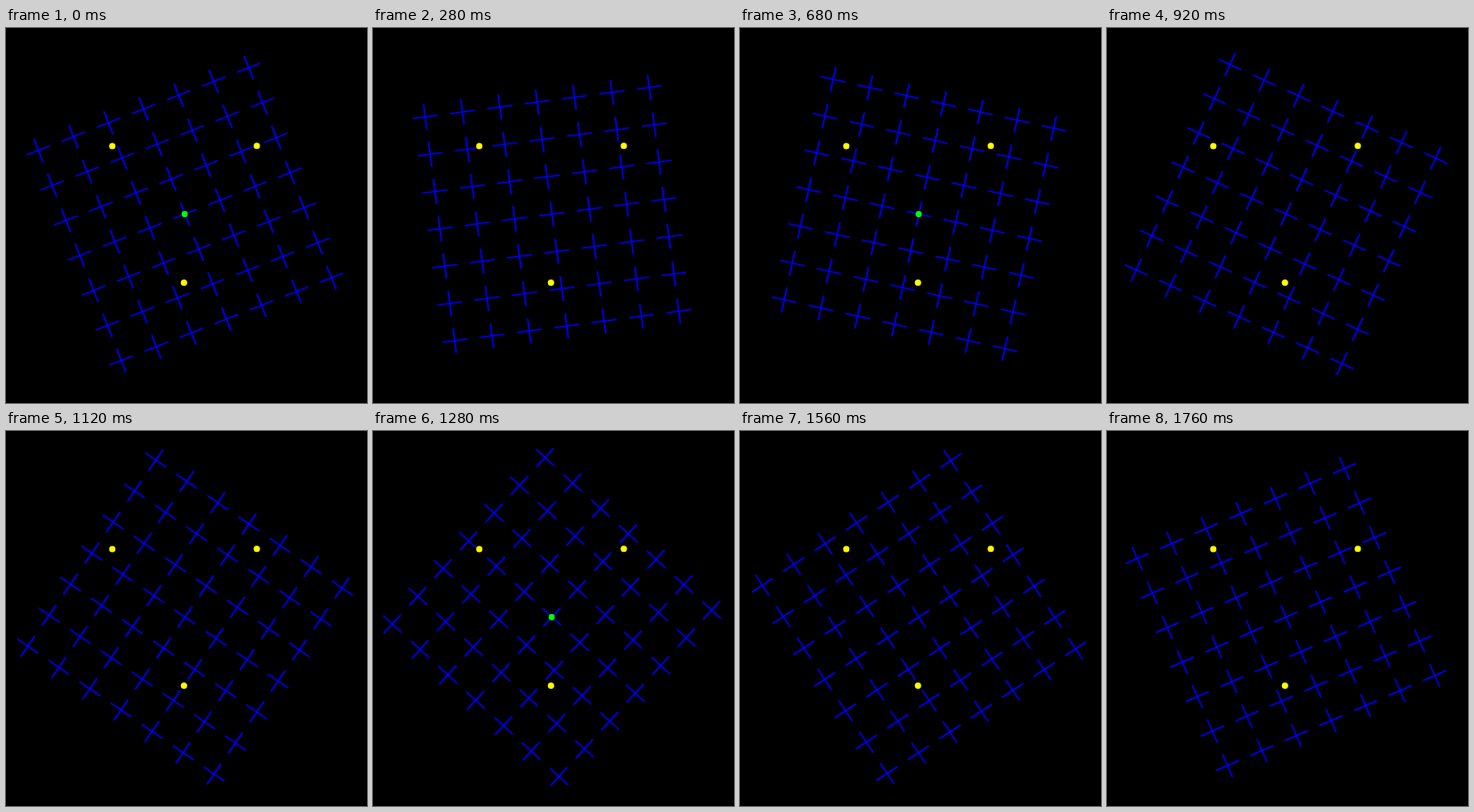
Recreate the animation shown at these times as an HTML page. Size 400 by 416 pixels, loop 1.8 s.

```html
<!DOCTYPE html>
<html lang="en">
<head>
<meta charset="utf-8">
<title>Rotating grid with dots</title>
<style>
  html, body { margin: 0; width: 100%; height: 100%; overflow: hidden; background: #000; }
  svg { display: block; width: 400px; height: 416px; }

  /* A quarter turn maps the grid onto itself, so the loop is seamless. */
  .grid {
    fill: none;
    stroke: #00f;
    stroke-width: 1.7;
    stroke-dasharray: 28 13.75;
    animation: turn 1800ms steps(45) infinite;
  }
  .dots { fill: #ff0; }
  .centre { fill: #0f0; animation: blink 600ms step-end infinite; }

  @keyframes turn {
    from { transform: rotate(-21.5deg); }
    to { transform: rotate(68.5deg); }
  }
  @keyframes blink {
    0% { opacity: 1; }
    46.66%, 100% { opacity: 0; }
  }
</style>
</head>
<body>
<svg viewBox="0 0 400 416">
  <defs>
    <!-- Dashed rows; crossed with a rotated copy they form the plus signs. -->
    <path id="rows" d="M-139.25-125.25h278.5 M-139.25-83.5h278.5 M-139.25-41.75h278.5
      M-139.25 0h278.5 M-139.25 41.75h278.5 M-139.25 83.5h278.5 M-139.25 125.25h278.5"/>
  </defs>
  <g transform="translate(198.3 206.4)">
    <g class="grid">
      <use href="#rows"/>
      <use href="#rows" transform="rotate(90)"/>
    </g>
  </g>
  <g class="dots">
    <circle cx="117.8" cy="131.1" r="3.5"/>
    <circle cx="277.9" cy="130.8" r="3.5"/>
    <circle cx="197.2" cy="282.6" r="3.5"/>
  </g>
  <circle class="centre" cx="198" cy="206.5" r="3.4"/>
</svg>
</body>
</html>
```
